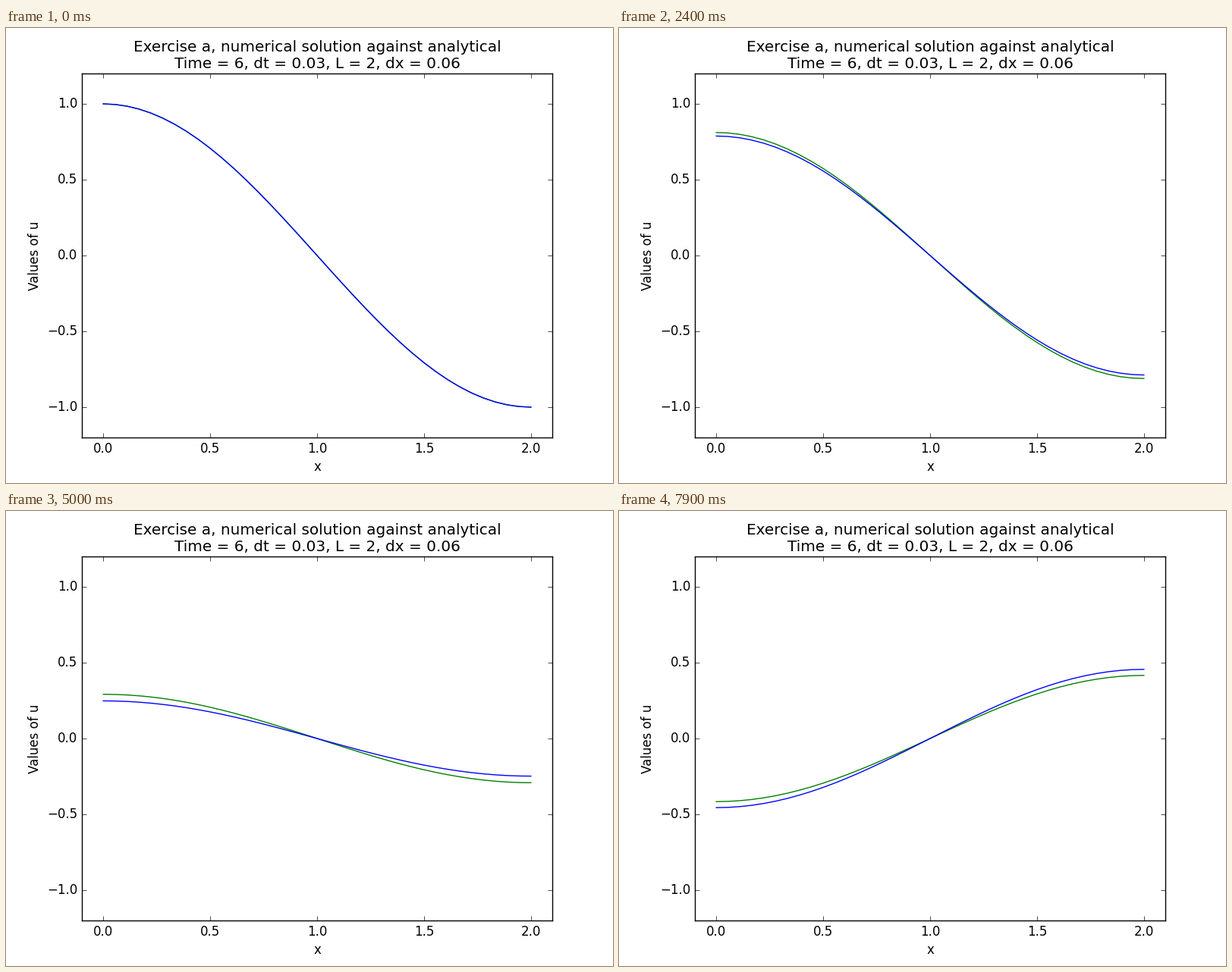
A matplotlib script for the animation above (8 s loop, 800x600 px).

```python
import numpy as np
import matplotlib.pyplot as plt
from matplotlib.animation import FuncAnimation

plt.style.use("classic")
plt.rcParams.update({
    "figure.dpi": 100,
    "savefig.dpi": "figure",
    "figure.facecolor": "white",
    "font.family": "DejaVu Sans",
})

FRAMES, INTERVAL = 80, 100
L, DT, CELLS = 2, 0.025, 36

x = np.linspace(0, L, CELLS + 1)
mode = np.cos(np.pi * x / L)

fig, ax = plt.subplots(figsize=(8, 6))
ax.set_xlim(-0.1, 2.1)
ax.set_ylim(-1.2, 1.2)
ax.set_xticks(np.arange(0, 2.1, 0.5))
ax.set_yticks(np.arange(-1, 1.1, 0.5))
ax.set_xlabel("x")
ax.set_ylabel("Values of u")
ax.set_title("Exercise a, numerical solution against analytical\n"
             "Time = 6, dt = 0.03, L = 2, dx = 0.06")

exact, = ax.plot(x, mode, color="green", lw=1)
numeric, = ax.plot(x, mode, color="blue", lw=1)


def error(n):
    """Amplitude error of the numerical solution after n steps."""
    a = 0.0257 * n
    return -0.046 * (np.sin(a) - 0.05 * np.sin(3 * a)) / 1.05


def update(n):
    amp = np.cos(DT * (n + 1))
    exact.set_ydata(amp * mode)
    numeric.set_ydata((amp + error(n)) * mode)
    return exact, numeric


anim = FuncAnimation(fig, update, frames=FRAMES, interval=INTERVAL,
                     repeat=True, repeat_delay=0)
plt.show()
```
